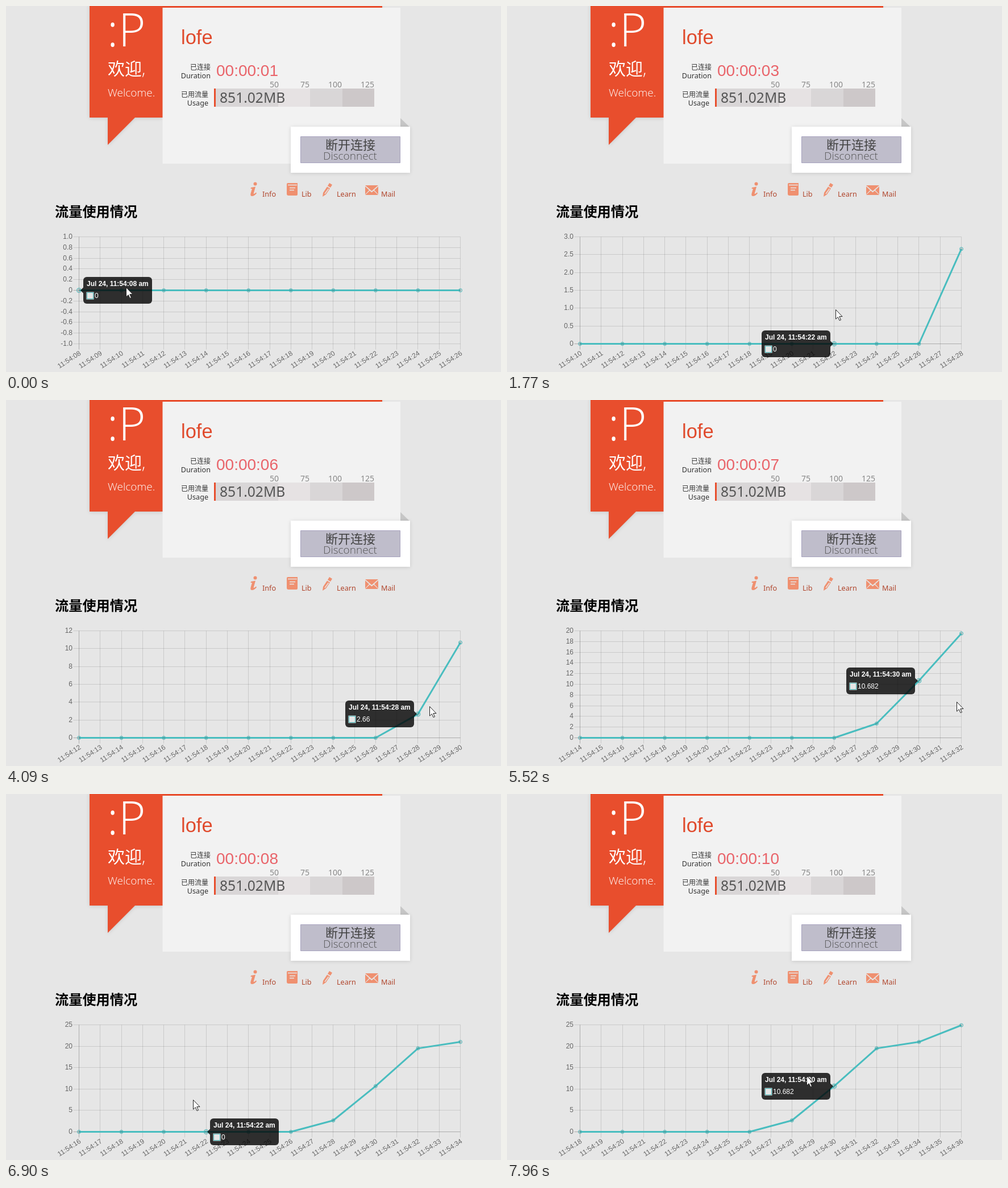
An HTML page with a canvas for the animation above (8000 ms loop, 871 by 643 pixels).

```html
<!DOCTYPE html>
<html lang="zh">
<head>
<meta charset="utf-8">
<title>流量使用情况</title>
<style>
html, body { margin: 0; width: 100%; height: 100%; overflow: hidden; background: #e6e6e6; }
svg, canvas { position: absolute; left: 0; top: 0; }
text { font-family: "Noto Sans", "Noto Sans CJK SC", "Noto Sans CJK", sans-serif; font-size: 12.6px; fill: #333; }
.light { font-family: "Open Sans", "Noto Sans CJK SC", "Noto Sans CJK", sans-serif; font-weight: 300; fill: #fff; }
.arial { font-family: "Liberation Sans", Arial, sans-serif; }
.cjk { font-size: 12px; }
.end { text-anchor: end; }
.mid { text-anchor: middle; }
.scale text { font-size: 14px; fill: #888; }
.links text { fill: #b0452c; }
.card { filter: drop-shadow(0 1px 3px rgba(0,0,0,.13)); }
</style>
</head>
<body>
<svg width="871" height="643" viewBox="0 0 871 643">
  <path class="card" fill="#e84e2d" d="M147-5H662V3H276V196H227L179 244V196H147Z"/>
  <path fill="#f2f2f2" d="M275.500 3H694V277H275.500Z"/>
  <path fill="#c6c6c6" d="M694 197L710 212.500H694Z"/>
  <path class="card" fill="#fff" d="M501 212H711V293H501Z"/>
  <path fill="#bfbdcb" stroke="#a7a3be" d="M518.500 229.500H693.500V275.500H518.500Z"/>

  <text class="light" style="font-size:81px" x="178 198" y="71">:P</text>
  <text class="light" style="font-size:30px" x="179" y="121">欢迎,</text>
  <text class="light" style="font-size:19px" x="179" y="159">Welcome.</text>

  <text class="arial" style="font-size:34.500px;fill:#e04a2c" x="308" y="67">lofe</text>
  <text class="cjk end" x="360" y="112">已连接</text>
  <text class="end" x="360" y="127">Duration</text>
  <text class="arial" id="duration" style="font-size:28px;fill:#e9646a" x="370" y="123">00:00:01</text>
  <text class="cjk end" x="356" y="160">已用流量</text>
  <text class="end" x="356" y="174.500">Usage</text>
  <g class="scale end">
    <text x="480" y="143">50</text><text x="534" y="143">75</text>
    <text x="591" y="143">100</text><text x="648" y="143">125</text>
  </g>
  <path fill="#e84e2d" d="M366 145h3v32h-3z"/>
  <path fill="#d9d6d7" d="M369 145h110v32h-110zM535 145h57v32h-57z"/>
  <path fill="#e6e2e3" d="M479 145h56v32h-56z"/>
  <path fill="#cdc8c9" d="M592 145h56v32h-56z"/>
  <text style="font-size:24.600px;fill:#555" x="376" y="170">851.02MB</text>

  <text class="mid" style="font-size:22px;font-weight:500;fill:#444" x="606" y="251.500">断开连接</text>
  <text class="light mid" style="font-size:19px;fill:#555" x="605.500" y="270">Disconnect</text>

  <g fill="#ef9070">
    <circle cx="438.500" cy="312.500" r="3"/>
    <path d="M431 319L439 317.500L435.500 330Q437.500 330 440 327.500L441 329Q437 334 433 334Q429.500 334 430.500 329.500L433 321L430.500 321Z"/>
    <path d="M496 311H513V331Q513 333 511 333H497Q494 333 494 330V313Q494 311 496 311Z"/>
    <path d="M569 311L574 314L571 319L566 316ZM565 317.500L570 320.500L563 331L557 335L558 328Z"/>
    <path d="M632 315H655L643.500 325ZM632 317L639 323.500L632 331ZM655 317L648 323.500L655 331ZM640 324.500L643.500 327.500L647 324.500L655 332H632Z"/>
  </g>
  <path fill="none" stroke="#e6e6e6" stroke-width="1.500" d="M496 314.500H512M499 319.500H509M499 323.500H507M567.500 321L561 330"/>
  <g class="links">
    <text x="451" y="335">Info</text><text x="520" y="335">Lib</text>
    <text x="582" y="335">Learn</text><text x="660" y="335">Mail</text>
  </g>
  <text style="font-size:24.200px;font-weight:700;fill:#000" x="86" y="370">流量使用情况</text>
</svg>
<canvas id="chart" width="871" height="643"></canvas>

<script>
const LOOP = 8000, LEFT = 128.5, RIGHT = 799.5, TOP = 405.5, BOTTOM = 593.5, POINTS = 10;
const TEAL = '#49bdbf', FONT = '12px "Liberation Sans", Arial, sans-serif';
const ctx = document.getElementById('chart').getContext('2d');
const duration = document.getElementById('duration');

// Readings arrive every two seconds; the first ten are zero.
const readings = [...Array(POINTS).fill(0), 2.66, 10.682, 19.5, 21, 24.9];
const scales = [[-1, 1, .2], [0, 3, .5], [0, 12, 2], [0, 20, 2], [0, 25, 5], [0, 25, 5]];
const updates = [[0, 1], [30, 770], [2130, 750], [4120, 200], [5900, 700], [7520, 430]]; // start, length
const ticks = [60, 1260, 2200, 3100, 3850, 5060, 5900, 7000, 7500];
const hovers = [ // time, hovered point
  [0, 0], [40, 1], [150, 2], [400, 3], [870, 4], [1330, 5], [1600, 6], [1880, 7], [3700, 8],
  [5540, 9], [5920, 8], [6060, 7], [6210, 6], [6360, 5], [6490, 4], [6690, 3], [6990, 2],
  [7050, 1], [7110, 0], [7260, 1], [7310, 2], [7370, 3], [7420, 4], [7560, 5], [7680, 6]
];
const mouse = [ // time, x, y
  [0, 211, 494], [30, 211, 494], [400, 365, 528], [850, 426, 533], [900, 440, 519],
  [1220, 440, 519], [2020, 640, 540], [2130, 640, 540], [2830, 679, 553], [2940, 679, 553],
  [3120, 692, 552], [3560, 692, 552], [4090, 745, 538], [4320, 757, 533], [5030, 757, 533],
  [5520, 791, 530], [5800, 794, 533], [5850, 794, 533], [6640, 440, 540], [6900, 330, 537],
  [7120, 135, 520], [7200, 135, 520], [7430, 400, 525], [7720, 545, 500], [7960, 527, 495]
];

const lerp = (a, b, p) => a + (b - a) * p;
const easeOut = p => 1 - (1 - Math.min(1, Math.max(0, p))) ** 4;
const lastAt = (list, t) => list.filter(e => e[0] <= t).length - 1;
const pad = n => String(n).padStart(2, '0');
const clock = s => '11:54:' + pad(s);
const xAt = i => lerp(LEFT, RIGHT, i / (POINTS - 1));
const yAt = (v, [min, max]) => lerp(BOTTOM, TOP, (v - min) / (max - min));

function line(x1, y1, x2, y2, color) {
  ctx.strokeStyle = color;
  ctx.lineWidth = 1;
  ctx.beginPath();
  ctx.moveTo(x1, y1);
  ctx.lineTo(x2, y2);
  ctx.stroke();
}

function write(str, x, y, align, color) {
  ctx.textAlign = align;
  ctx.textBaseline = 'middle';
  ctx.fillStyle = color;
  ctx.fillText(str, x, y);
}

const gridColor = zero => zero ? 'rgba(0,0,0,.25)' : 'rgba(0,0,0,.12)';

function drawAxes(k) {
  const [min, max, step] = scales[k];
  ctx.font = FONT;
  for (let i = 0, n = Math.round((max - min) / step); i <= n; i++) {
    const v = min + i * step, zero = Math.abs(v) < 1e-6;
    const y = Math.floor(yAt(v, scales[k])) + .5;
    line(LEFT - 10, y, RIGHT, y, gridColor(zero));
    write(zero ? '0' : v.toFixed(step < 1 ? 1 : 0), 117, y, 'right', '#666');
  }
  for (let i = 0; i < 19; i++) {
    const x = lerp(LEFT, RIGHT, i / 18), px = Math.floor(x) + .5;
    line(px, TOP, px, BOTTOM + 10, gridColor(i === 0));
    ctx.save();
    ctx.translate(x + 2.2, 609.3);
    ctx.rotate(-33 * Math.PI / 180);
    write(clock(8 + 2 * k + i), 0, 0, 'right', '#666');
    ctx.restore();
  }
}

function drawSeries(t, k, hovered) {
  const e = easeOut((t - updates[k][0]) / updates[k][1]);
  const before = scales[Math.max(0, k - 1)];
  const pts = readings.slice(k, k + POINTS).map((v, i) => {
    const from = yAt(i === POINTS - 1 ? 0 : v, before);
    return [xAt(k ? i + 1 - e : i), k ? lerp(from, yAt(v, scales[k]), e) : yAt(v, scales[0])];
  });
  ctx.save();
  ctx.beginPath();
  ctx.rect(LEFT - 1.5, TOP - 1.5, RIGHT - LEFT + 3, BOTTOM - TOP + 3);
  ctx.clip();
  ctx.strokeStyle = TEAL;
  ctx.lineWidth = 3;
  ctx.lineJoin = 'round';
  ctx.beginPath();
  pts.forEach(p => ctx.lineTo(...p));
  ctx.stroke();
  ctx.restore();
  ctx.lineWidth = 1;
  ctx.strokeStyle = TEAL;
  ctx.fillStyle = 'rgba(0,0,0,.1)';
  pts.forEach(([x, y], i) => {
    if (x > RIGHT + 1) return;
    ctx.beginPath();
    ctx.arc(x, y, i === hovered ? 4 : 3, 0, 7);
    ctx.fill();
    ctx.stroke();
  });
}

// Resting place of the tooltip box at time t.
function tipTarget(t) {
  const i = hovers[lastAt(hovers, t)][1], k = lastAt(updates, t);
  return [xAt(i) + (i < POINTS / 2 ? 7 : -128), yAt(readings[k + i], scales[k]) - 23.5];
}

function drawTooltip(t, k, i) {
  const since = Math.max(hovers[lastAt(hovers, t)][0], updates[k][0]);
  const goal = tipTarget(t), start = tipTarget(Math.max(0, since - 1));
  const e = easeOut((t - since) / 200);
  const [x, y] = goal.map((g, n) => Math.round(lerp(start[n], g, e)));
  const w = 121, h = 47, right = i >= POINTS / 2;
  const edge = right ? x + w : x, tip = right ? edge + 5 : edge - 5;
  ctx.fillStyle = 'rgba(0,0,0,.8)';
  ctx.beginPath();
  ctx.roundRect(x, y, w, h, 6);
  ctx.fill();
  ctx.beginPath();
  ctx.moveTo(edge, y + h / 2 - 5);
  ctx.lineTo(tip, y + h / 2);
  ctx.lineTo(edge, y + h / 2 + 5);
  ctx.fill();
  ctx.font = 'bold ' + FONT;
  write(`Jul 24, ${clock(8 + 2 * (k + i))} am`, x + 6, y + 12.5, 'left', '#fff');
  ctx.fillStyle = '#fff';
  ctx.fillRect(x + 5.5, y + 26.5, 13, 13);
  ctx.fillStyle = TEAL;
  ctx.fillRect(x + 6, y + 27, 12, 12);
  ctx.fillStyle = '#e6e6e6';
  ctx.fillRect(x + 7, y + 28, 10, 10);
  ctx.font = FONT;
  write(String(readings[k + i]), x + 20, y + 33.5, 'left', '#fff');
}

function drawMouse(t) {
  const n = lastAt(mouse, t), a = mouse[n], b = mouse[n + 1] || a;
  const p = b === a ? 0 : (t - a[0]) / (b[0] - a[0]);
  ctx.save();
  ctx.translate(Math.round(lerp(a[1], b[1], p)) + .5, Math.round(lerp(a[2], b[2], p)) + .5);
  const arrow = new Path2D('M0 0V16.500L3.800 13L6.500 19L9 18L6.300 12H11.500Z');
  ctx.fillStyle = '#fff';
  ctx.fill(arrow);
  ctx.strokeStyle = '#222';
  ctx.lineWidth = 1;
  ctx.stroke(arrow);
  ctx.restore();
}

function frame(now) {
  const t = now % LOOP, k = lastAt(updates, t), i = hovers[lastAt(hovers, t)][1];
  duration.textContent = '00:00:' + pad(1 + ticks.filter(s => s <= t).length);
  ctx.clearRect(0, 0, 871, 643);
  drawAxes(k);
  drawSeries(t, k, i);
  drawTooltip(t, k, i);
  drawMouse(t);
  requestAnimationFrame(frame);
}
requestAnimationFrame(frame);
</script>
</body>
</html>
```
